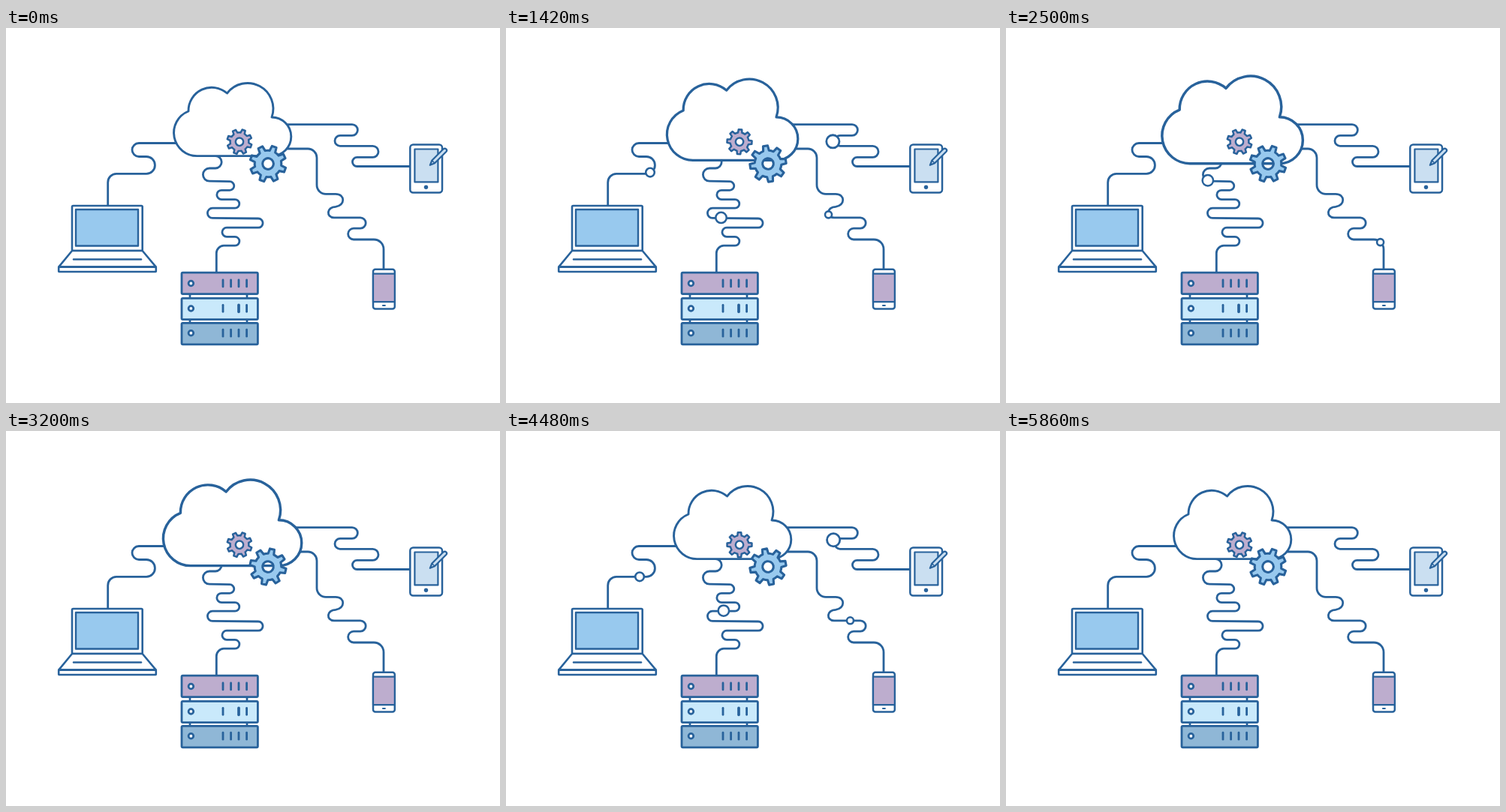
These frames come from a looping animation (658x500 px, 6 s). An HTML page with a canvas:

```html
<!DOCTYPE html>
<html lang="en">
<head>
<meta charset="utf-8">
<title>Cloud network</title>
<style>
html, body { margin: 0; width: 100%; height: 100%; overflow: hidden; background: #fff; }
canvas { display: block; width: 658px; height: 500px; }
</style>
</head>
<body>
<canvas id="stage"></canvas>
<script>
const W = 658, H = 500, LOOP = 6000, FADE = 200;
const INK = '#28629b', BLUE = '#98c9ee', MAUVE = '#bdadce', PALE = '#cadff1',
      ICE = '#c9e9fb', STEEL = '#8fb7d6', WHITE = '#fff';

const canvas = document.getElementById('stage');
const ctx = canvas.getContext('2d');
const dpr = window.devicePixelRatio || 1;
canvas.width = W * dpr;
canvas.height = H * dpr;

// Cables run from the cloud to a device. "out" and "back" hold the times
// at which the ball is at the cloud end (c) and at the device end (d).
const cables = [
  { // laptop
    d: 'M228 153.5H177A9 9 0 0 0 177 171.5H187A11.4 11.4 0 0 1 187 194.3H147A11.3 11.5 0 0 0 135.7 206V237',
    r: 5.8, w: 2.6, dx: -1, dy: 0,
    trips: [{ c: 88, d: 2492 }, { c: 5770, d: 3695 }]
  },
  { // tablet
    d: 'M375 128.6H461A7.4 7.4 0 0 1 461 143.4H445A7 7 0 0 0 445 157.4H488.5A7.5 7.5 0 0 1 488.5 172.4H467.5A6 6 0 0 0 467.5 184.5H538',
    r: 8.6, w: 2.8, dx: -3, dy: -1.3,
    trips: [{ c: 2432, d: 61 }, { c: 3544, d: 5846 }]
  },
  { // phone
    d: 'M375 161H402A12 12 0 0 1 414 173V209A12 12 0 0 0 426 221.3H439C452 221.3 452 237 439 238.3C427 238.5 426 252.5 437 252.8H472A7.2 7.2 0 0 1 472 267.2H463A7.4 7.4 0 0 0 463 282H490A13 13 0 0 1 503 295V322',
    r: 4.5, w: 2.6, dx: -0.4, dy: 0,
    trips: [{ c: 150, d: 2800 }, { c: 5855, d: 3450 }]
  },
  { // server
    d: 'M279 170.6A8.2 8.2 0 0 1 279 187H271A8.6 8.6 0 0 0 271 204.2L298 204.7A5.6 5.6 0 0 1 298 216.3H287A6 6 0 0 0 287 228.6H305A5.8 5.8 0 0 1 305 240.2H275A6.6 6.6 0 0 0 275 253.4L336 254A6 6 0 0 1 336 266.2H294A6.1 6.1 0 0 0 294 278.4H305A5.9 5.9 0 0 1 305 290.2H290A10 10 0 0 0 280.3 300V326',
    r: 7.2, w: 2.5, dx: 0, dy: -0.6,
    trips: [{ c: 2860, d: 100 }, { c: 3560, d: 5770 }]
  }
];
for (const c of cables) {
  c.line = new Path2D(c.d);
  c.track = document.createElementNS('http://www.w3.org/2000/svg', 'path');
  c.track.setAttribute('d', c.d);
  c.length = c.track.getTotalLength();
}

const cloud = new Path2D('M255 170.6A30.9 30.9 0 0 1 243 111A31 31 0 0 1 294.5 87A34.2 34.2 0 0 1 354 119A25.8 25.8 0 0 1 354 170.6Z');

function gearPath(tip, root, half, hole) {
  const p = new Path2D();
  const rootA = Math.asin(half * 1.15 / root), tipA = Math.asin(half * 0.9 / tip);
  for (let i = 0; i < 8; i++) {
    const a = i * Math.PI / 4 - Math.PI / 2;
    p.arc(0, 0, root, a - Math.PI / 4 + rootA, a - rootA);
    p.lineTo(tip * Math.cos(a - tipA), tip * Math.sin(a - tipA));
    p.lineTo(tip * Math.cos(a + tipA), tip * Math.sin(a + tipA));
    p.lineTo(root * Math.cos(a + rootA), root * Math.sin(a + rootA));
  }
  p.closePath();
  p.moveTo(hole, 0);
  p.arc(0, 0, hole, 0, Math.PI * 2);
  return p;
}
const gears = [
  { x: 311, y: 151.7, path: gearPath(16.6, 12.4, 2.4, 5.2), fill: MAUVE, w: 2.5, dir: 1, again: [3240, 5520] },
  { x: 349, y: 181, path: gearPath(24.2, 17.8, 3.4, 7.3), fill: BLUE, w: 3.1, dir: -1, again: [2960, 5700] }
];

const clamp = v => Math.min(1, Math.max(0, v));
const ease = (t, a, b) => (1 - Math.cos(Math.PI * clamp((t - a) / (b - a)))) / 2;

function paint(path, fill, width) {
  if (fill) {
    ctx.fillStyle = fill;
    ctx.fill(path, 'evenodd');
  }
  if (width) {
    ctx.lineWidth = width;
    ctx.stroke(path);
  }
}

function box(x1, y1, x2, y2, r, fill, width) {
  const p = new Path2D();
  p.roundRect(x1, y1, x2 - x1, y2 - y1, r);
  paint(p, fill, width);
}

function disc(x, y, r, fill, width) {
  const p = new Path2D();
  p.arc(x, y, r, 0, Math.PI * 2);
  paint(p, fill, width);
}

const line = (d, width) => paint(new Path2D(d), null, width);

function ball(c, t) {
  for (const trip of c.trips) {
    const start = Math.min(trip.c, trip.d), end = Math.max(trip.c, trip.d);
    if (t <= start || t >= end) continue;
    const p = (t - trip.c) / (trip.d - trip.c);
    const at = c.track.getPointAtLength(p * c.length);
    ctx.globalAlpha = clamp((t - start) / FADE) * clamp((end - t) / FADE);
    disc(at.x + c.dx, at.y + c.dy, c.r, WHITE, c.w);
    ctx.globalAlpha = 1;
  }
}

function laptop() {
  box(88, 237, 181.7, 297, 1.5, WHITE, 2.6);
  box(93, 242, 176, 290.5, 0, BLUE, 2.4);
  paint(new Path2D('M88 297H181.7L199.8 318.6H70.2Z'), WHITE, 2.6);
  box(70.2, 318.6, 199.8, 325, 0.5, WHITE, 2.6);
  line('M90 308.4H180', 2.5);
}

function server() {
  line('M245 352V396M321 352V396', 2.8);
  const units = [[326.2, 354.6, MAUVE], [360.3, 388.6, ICE], [393.3, 421.8, STEEL]];
  units.forEach(([top, bottom, fill], i) => {
    const y = (top + bottom) / 2 - (i === 2 ? 0.8 : 0.5) + (i ? 0 : 0.6);
    box(234, top, 335.4, bottom, 1.5, fill, 2.8);
    disc(246.4, y, 3.3, WHITE, 2.8);
    for (const x of [289, 299.6, 310, 320.6]) {
      if (i === 1 && x === 299.6) continue;
      line(`M${x} ${y - 4.6}V${y + 4.4}`, i === 1 && x === 310 ? 3.7 : 2.8);
    }
  });
}

function tablet() {
  box(538.3, 155.4, 581, 219.6, 4, WHITE, 2.5);
  box(544.4, 161.5, 575.4, 205.4, 0, PALE, 2.2);
  disc(559.5, 212.2, 2.7, INK);
  paint(new Path2D('M564.8 182.8L567.4 176.5L582.6 161.3Q584.6 159.8 586.4 161.5Q588 163.2 586.3 165L571 180.2Z'), PALE, 2.2);
  line('M567.4 176.5L571 180.2', 1.5);
}

function phone() {
  box(489, 321.8, 517.8, 374.4, 3, WHITE, 2.5);
  box(489, 327.6, 517.8, 365.2, 0, MAUVE, 2.2);
  line('M502 370H504.8', 2.2);
}

function gear(g, t) {
  const turns = ease(t, 100, 2500) + ease(t, ...g.again);
  ctx.save();
  ctx.translate(g.x, g.y);
  ctx.rotate(20 * Math.PI / 180 + g.dir * turns * Math.PI * 2);
  paint(g.path, g.fill, g.w);
  ctx.restore();
}

function draw(t) {
  ctx.setTransform(dpr, 0, 0, dpr, 0, 0);
  ctx.fillStyle = WHITE;
  ctx.fillRect(0, 0, W, H);
  ctx.strokeStyle = INK;
  ctx.lineCap = ctx.lineJoin = 'round';

  for (const c of cables) paint(c.line, null, 2.8);
  for (const c of cables) ball(c, t);
  laptop();
  server();
  tablet();
  phone();

  const scale = 1 + 0.2 * (ease(t, 100, 2500) - ease(t, 2880, 4430));
  ctx.save();
  ctx.translate(302, 120.2);
  ctx.scale(scale, scale);
  ctx.translate(-302, -120.2);
  paint(cloud, WHITE, 2.9);
  ctx.restore();

  for (const g of gears) gear(g, t);
}

const begin = performance.now();
function tick() {
  draw((performance.now() - begin) % LOOP);
  requestAnimationFrame(tick);
}
tick();
</script>
</body>
</html>
```
